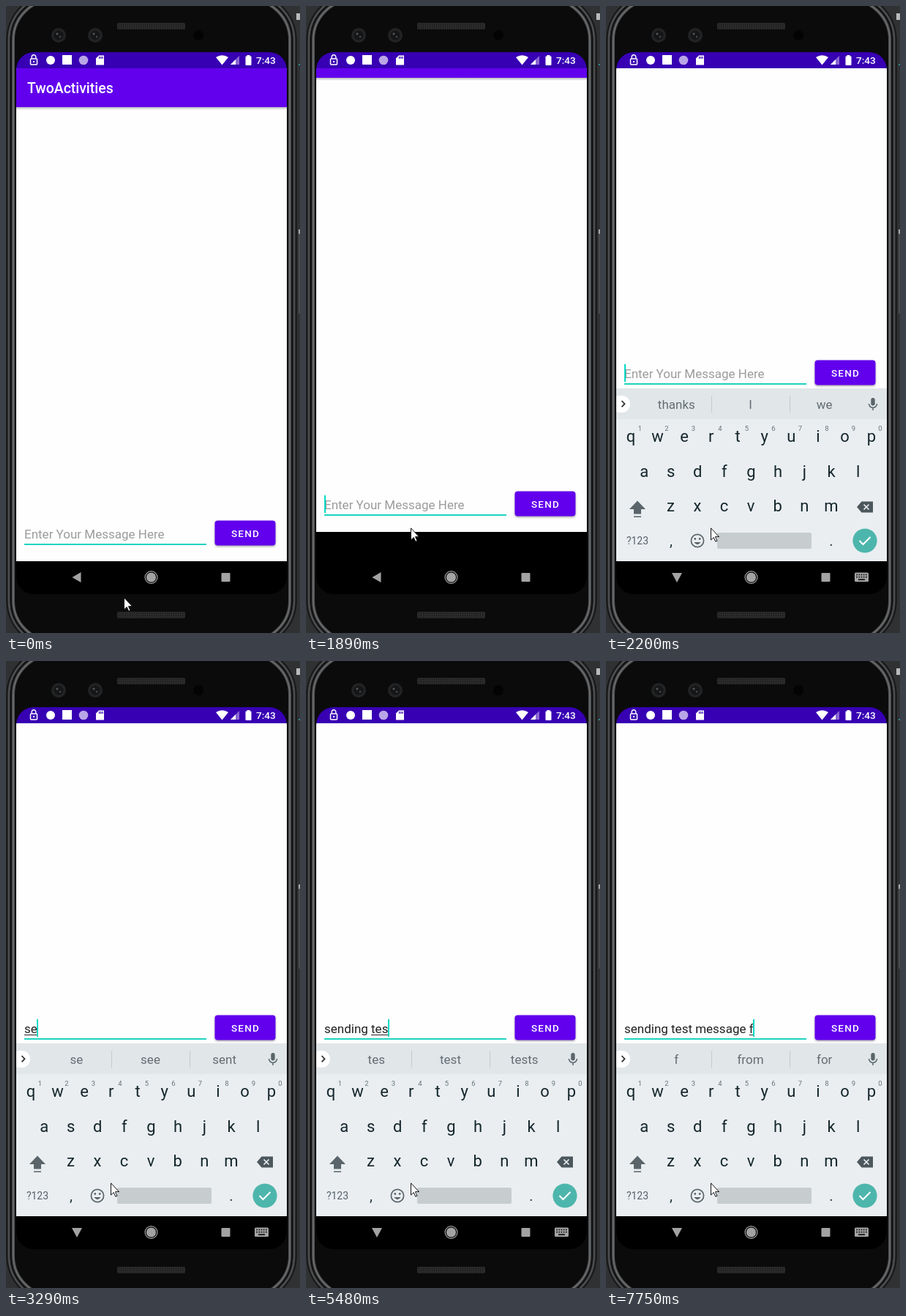
An HTML page with a canvas that plays this animation: 402x856 px, repeating every 7.99 s.

```html
<!DOCTYPE html>
<html lang="en">
<head>
<meta charset="utf-8">
<title>TwoActivities</title>
<style>
html, body { margin: 0; width: 100%; height: 100%; overflow: hidden; background: #2b2b2b; }
canvas { display: block; width: 402px; height: 856px; }
</style>
</head>
<body>
<canvas id="stage"></canvas>
<script>
const LOOP = 7990, W = 402, H = 856, PAN = 219;
const TEAL = '#03dac5', PURPLE = '#6200ee';
const canvas = document.getElementById('stage');
const ctx = canvas.getContext('2d');
const dpr = window.devicePixelRatio || 1;
canvas.width = W * dpr;
canvas.height = H * dpr;

// time, finished words, word being composed, suggestions
const typing = [
  [0, '', '', 'thanks', 'I', 'we'],
  [3130, '', 's', 's', 'so', 'some'],
  [3290, '', 'se', 'se', 'see', 'sent'],
  [4240, '', 'sen', 'sen', 'send', 'sent'],
  [4390, '', 'send', 'send', 'sending', 'sends'],
  [4540, '', 'sendi', 'sendi', 'sending', ''],
  [4620, '', 'sendin', 'sendin', 'sending', ''],
  [4780, '', 'sending', 'sending', 'sensing', ''],
  [5020, 'sending ', '', 'it', 'you', 'the'],
  [5320, 'sending ', 't', 't', 'to', 'the'],
  [5400, 'sending ', 'te', 'te', 'the', 'text'],
  [5480, 'sending ', 'tes', 'tes', 'test', 'tests'],
  [5710, 'sending ', 'test', 'test', 'testing', 'tests'],
  [6030, 'sending test ', '', 'for', 'and', 'the'],
  [6170, 'sending test ', 'm', 'm', 'my', 'me'],
  [6250, 'sending test ', 'me', 'me', 'message', 'meet'],
  [6650, 'sending test ', 'mes', 'mes', 'message', 'mesh'],
  [6800, 'sending test ', 'mess', 'mess', 'message', 'mesh'],
  [6950, 'sending test ', 'messa', 'messa', 'message', ''],
  [7180, 'sending test ', 'messag', 'messag', 'message', 'messages'],
  [7330, 'sending test ', 'message', 'message', 'messages', 'messaged'],
  [7730, 'sending test message ', '', 'to', 'and', 'from'],
  [7750, 'sending test message ', 'f', 'f', 'from', 'for']
];

const clamp = v => Math.max(0, Math.min(1, v));

function rect(x, y, w, h, color) {
  ctx.fillStyle = color;
  ctx.fillRect(x, y, w, h);
}

function round(x, y, w, h, r, fill, stroke, width) {
  ctx.beginPath();
  ctx.roundRect(x, y, w, h, r);
  paint(fill, stroke, width);
}

function disc(x, y, r, fill, stroke, width) {
  ctx.beginPath();
  ctx.arc(x, y, r, 0, 7);
  paint(fill, stroke, width);
}

function paint(fill, stroke, width = 1) {
  if (fill) { ctx.fillStyle = fill; ctx.fill(); }
  if (stroke) { ctx.strokeStyle = stroke; ctx.lineWidth = width; ctx.stroke(); }
}

function shape(d, x, y, fill, stroke, width) {
  ctx.save();
  ctx.translate(x, y);
  const p = new Path2D(d);
  if (fill) { ctx.fillStyle = fill; ctx.fill(p); }
  if (stroke) { ctx.strokeStyle = stroke; ctx.lineWidth = width; ctx.stroke(p); }
  ctx.restore();
}

function text(s, x, y, size, color, align = 'left', weight = 400, spacing = 0) {
  ctx.font = `${weight} ${size}px Roboto, sans-serif`;
  ctx.letterSpacing = spacing + 'px';
  ctx.textAlign = align;
  ctx.fillStyle = color;
  ctx.fillText(s, x, y);
  ctx.letterSpacing = '0px';
}

function speaker(y) {
  round(152, y, 93, 9, 2, '#2b2b2b');
  ctx.fillStyle = '#1b1b1b';
  for (let x = 154; x < 244; x += 3)
    for (let j = 1; j < 8; j += 3) ctx.fillRect(x, y + j, 1, 2);
}

function camera(x, r) {
  disc(x, 40, r, '#222324');
  disc(x, 40, r - 3.5, '#151617');
  disc(x - 2, 38, 1.5, '#55585a');
  disc(x + 2, 42, 1.3, '#47494b');
}

// One line of the metal rim, a given distance inside the phone's edge.
function rim(inset, color, width) {
  round(0.5 + inset, -18 + inset, 397 - 2 * inset, 894 - 2 * inset, 64 - inset, null, color, width);
}

function phone() {
  rect(0, 0, W, H, '#303132');
  rect(397, 10, 5, 9, '#b9babb');
  rect(400, 79, 2, 2, '#2b8a8a');
  rect(400, 308, 2, 112, '#4a4b4c');
  rect(400, 305, 2, 6, '#a5a6a7');
  round(0.5, -18, 397, 894, 64, '#0b0b0c');
  rim(1, '#1a1a1b', 2);
  rim(3.5, '#4c4d4e', 3);
  rim(6.5, '#131314', 3);
  rim(9.5, '#4a4b4c', 4);
  rim(9.5, '#6e6f70', 1.5);
  speaker(23);
  speaker(827);
  camera(72, 10);
  camera(122, 10);
  disc(263, 40, 7, '#030303');
}

function statusBar() {
  const c = '#fff';
  rect(14, 63, 370, 22, '#3700b3');
  round(33.5, 72, 9, 8, 1, null, c, 1.5);
  shape('M-2.8 0V-2a2.8 2.8 0 0 1 5.6 0V0', 38, 71.5, null, c, 1.4);
  disc(38, 76, 1.2, c);
  disc(61, 74, 6, c);
  rect(77, 67, 13, 13, c);
  disc(106, 74, 6.3, '#b9a5e6');
  shape('M0 4L4 0H11V13H0Z', 123, 67.5, c);
  for (let i = 0; i < 3; i++) rect(127 + i * 2.2, 69, 1.2, 3, '#3700b3');
  shape('M0 13L-8.5 2.5Q0 -3 8.5 2.5Z', 295.5, 67.5, c);
  shape('M12 0V12H0Z', 307, 68, '#8a68d2');
  shape('M7 5V12H0Z', 307, 68, c);
  round(327.5, 68.5, 8, 12.5, 1, c);
  rect(329.5, 67, 4, 2, c);
  text('7:43', 342, 79, 13.6, c, 'left', 500);
}

function current(t) {
  let now = typing[0];
  for (const k of typing) if (t >= k[0]) now = k;
  return now;
}

function caretOn(t) {
  return t >= 1050 && !(t >= 2590 && t < 3050) && !(t >= 3840 && t < 4240);
}

// The app window, in its resting place before it pans up.
function app(t, pan) {
  const [, done, word] = current(t);
  ctx.save();
  ctx.beginPath();
  ctx.rect(14, 85, 370, 718);
  ctx.clip();
  ctx.translate(0, -Math.round(pan));
  rect(14, 85, 370, 673, '#fefefe');
  const g = ctx.createLinearGradient(0, 138, 0, 142);
  g.addColorStop(0, 'rgba(0,0,0,.28)');
  g.addColorStop(1, 'rgba(0,0,0,0)');
  rect(14, 138, 370, 4, g);
  rect(14, 85, 370, 53, PURPLE);
  text('TwoActivities', 29, 119, 19.4, '#fff', 'left', 500);

  if (done || word) {
    text(done + word, 25, 727, 17, '#212121');
  } else {
    text('Enter Your Message Here', 25, 727, 17, '#9b9b9b');
  }
  const start = ctx.measureText(done).width;
  const end = ctx.measureText(done + word).width;
  if (word) rect(25 + start, 729, end - start, 1, '#212121');
  rect(25, 734, 249, 2, '#1fd3c1');
  if (caretOn(t)) rect(Math.round(24.6 + end), 708, 2, 24, TEAL);

  ctx.save();
  ctx.shadowColor = 'rgba(0,0,0,.35)';
  ctx.shadowBlur = 3 * dpr;
  ctx.shadowOffsetY = 1.5 * dpr;
  round(285.5, 702.5, 83, 34, 4, PURPLE);
  ctx.restore();
  text('SEND', 308, 725, 13.5, '#fff', 'left', 500, 1.2);
  ctx.restore();
}

function keyRow(keys, x, y) {
  [...keys].forEach((k, i) => text(k, x + i * 36.55, y, 22, '#14262c', 'center'));
}

function keyboard(t) {
  const gray = '#59656a', bg = '#eaeef1';
  rect(14, 522, 370, 281, bg);
  rect(14, 522, 370, 42, '#e1e6e9');
  round(8, 532, 25, 23, 11.5, '#fff');
  shape('M0 0L4 4.2L0 8.4', 21.5, 539, null, '#333', 1.8);
  rect(144, 532, 1, 23, '#c5cacd');
  rect(251, 532, 1, 23, '#c5cacd');
  current(t).slice(3).forEach((s, i) => text(s, 96.3 + i * 101.2, 550, 17, '#626d72', 'center'));
  round(362.3, 535, 5.4, 10.5, 2.7, gray);
  shape('M-5.5 0a5.5 5.5 0 0 0 11 0M0 5.5V9', 365, 543, null, gray, 1.5);

  keyRow('qwertyuiop', 34, 595);
  [...'1234567890'].forEach((k, i) => text(k, 46.5 + i * 36.5, 580, 9.5, '#687378', 'center'));
  keyRow('asdfghjkl', 52.2, 643);
  keyRow('zxcvbnm', 88.5, 690);

  shape('M0 0L11 11.5H5V18H-5V11.5H-11Z', 43, 675.5, gray);
  rect(38, 696.5, 10, 1.5, gray);
  shape('M0 7.5L6.5 0H22V15H6.5Z', 343, 676.5, '#4b575c');
  shape('M0 0L7 7M7 0L0 7', 352.5, 680.5, null, bg, 1.7);

  text('?123', 43, 735, 14, '#55616a', 'center');
  text(',', 89, 737, 20, '#26363c', 'center');
  text('.', 308, 737, 20, '#26363c', 'center');
  disc(125, 730, 8.6, null, gray, 1.7);
  disc(121.8, 727.5, 1.4, gray);
  disc(128.2, 727.5, 1.4, gray);
  shape('M-4.6 0Q0 6.5 4.6 0Z', 125, 732, gray);
  round(152, 719, 129, 22, 2, '#c7cccf');
  disc(354, 730, 16.6, '#4db6ac');
  shape('M0 5L5 10L15 0', 346.5, 725, null, '#fff', 2);
}

function navBar(open) {
  const c = '#a3a3a3';
  shape(open ? 'M-7 -6H7L0 7Z' : 'M5.5 -7V7L-6.5 0Z', 97, 780, c);
  disc(198.5, 780, 6.6, c);
  disc(198.5, 780, 8.4, null, c, 1.2);
  round(294.5, 774, 12, 12, 1, c);
  if (!open) return;
  round(340, 773.5, 19, 12.5, 1.5, c);
  for (let i = 0; i < 5; i++) {
    rect(342.2 + i * 3.2, 775.6, 1.7, 1.7, '#111');
    rect(342.2 + i * 3.2, 778.8, 1.7, 1.7, '#111');
  }
  rect(345, 782.3, 9, 1.7, '#111');
}

function pointer(t) {
  const n = t < 70 ? 0 : Math.min(11, Math.floor((t - 70) / 73) + 1);
  const p = n / 11, e = p * p * (3 - 2 * p);
  const x = Math.round(161 - 18 * e), y = Math.round(807 - 95 * e);
  shape('M.5 .8V17L4.2 13.5L6.8 19.2L9 18.2L6.5 12.6H11.6Z', x, y, '#fff', '#111', 1);
}

function draw(t) {
  ctx.setTransform(dpr, 0, 0, dpr, 0, 0);
  phone();

  // The slide moves in coarse steps.
  const s = t < 1890 ? 0 : 1890 + Math.floor((t - 1890) / 75) * 75;
  const pan = PAN * (1 - Math.pow(1 - clamp((s - 1860) / 300), 1.94));
  const rise = clamp((s - 1960) / 200);
  const drop = Math.round(200 * (1 - rise) ** 2);

  ctx.save();
  ctx.beginPath();
  ctx.roundRect(14, 63, 370, 740, 24);
  ctx.clip();
  rect(14, 63, 370, 740, '#000');
  app(t, pan);
  statusBar();
  if (rise > 0) {
    ctx.save();
    ctx.beginPath();
    ctx.rect(14, 522, 370, rise < 1 ? 281 : 236);
    ctx.clip();
    ctx.translate(0, drop);
    keyboard(t);
    // Fade from black while the keys rise.
    rect(14, 522, 370, 281, `rgba(0,0,0,${clamp(1 - rise * 1.25)})`);
    ctx.restore();
  }
  navBar(rise > 0);
  ctx.restore();
  pointer(t);
}

const begin = performance.now();
function tick() {
  draw((performance.now() - begin) % LOOP);
  requestAnimationFrame(tick);
}
tick();
</script>
</body>
</html>
```
